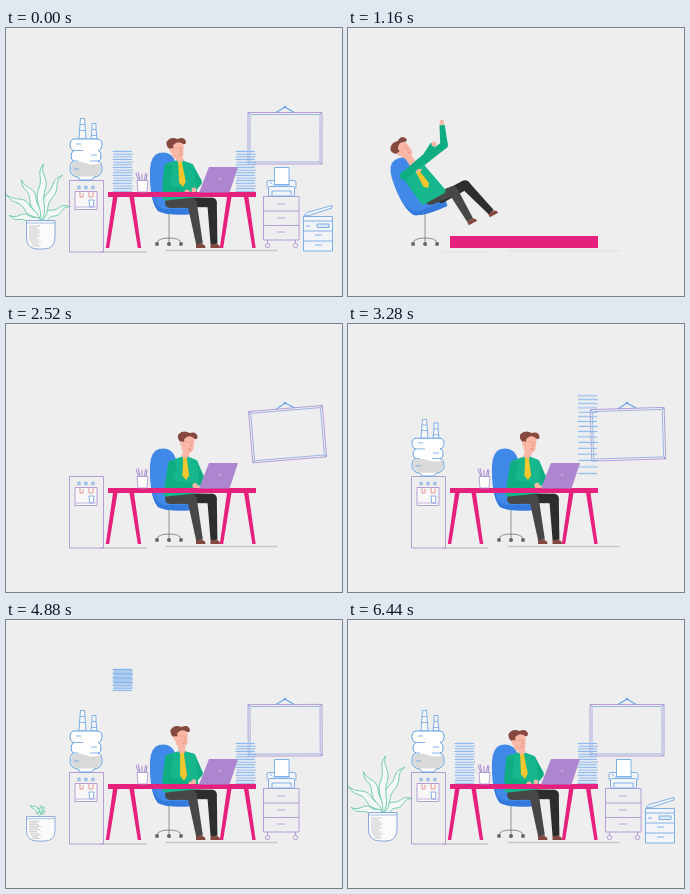
These frames come from a looping animation (336 px wide and 268 px high, 6.48 s). An HTML page with a canvas:

```html
<!DOCTYPE html>
<html>
<head>
<meta charset="utf-8">
<style>
html, body { margin: 0; height: 100%; overflow: hidden; background: #eee }
canvas { display: block; width: 336px; height: 268px }
</style>
</head>
<body>
<canvas></canvas>
<script>
const LOOP = 6480, PAN_END = 960;
const BLUE = '#62a0e6', PURPLE = '#a98bd0', PINK = '#e6207d', GREEN = '#16b78c', SLEEVE = '#10ad83',
  SKIN = '#f9b7a6', HAIR = '#85493f', GRAY = '#858585', NEAR = '#484748', FAR = '#2d2d2d';
const canvas = document.querySelector('canvas'), c = canvas.getContext('2d');
const dpr = window.devicePixelRatio || 1;
canvas.width = 336 * dpr;
canvas.height = 268 * dpr;

const seg = (t, a, b) => Math.max(0, Math.min(1, (t - a) / (b - a)));
const mix = (a, b, p) => a + (b - a) * p;
const smooth = p => p * p * (3 - 2 * p);
const back = p => 1 + 2.7 * (p - 1) ** 3 + 1.7 * (p - 1) ** 2;

function draw(d, fill, stroke, width = 0.8) {
  const p = d instanceof Path2D ? d : new Path2D(d);
  if (fill) { c.fillStyle = fill; c.fill(p); }
  if (stroke) { c.strokeStyle = stroke; c.lineWidth = width; c.stroke(p); }
}
function box(x, y, w, h, fill, stroke, r = 0) {
  const p = new Path2D();
  p.roundRect(x, y, w, h, r);
  draw(p, fill, stroke);
}
function oval(x, y, rx, ry, fill, stroke) {
  const p = new Path2D();
  p.ellipse(x, y, rx, ry, 0, 0, 7);
  draw(p, fill, stroke);
}
// Draws around a pivot with rotation (degrees) and scale; fn uses stage coordinates.
function around(x, y, deg, sx, sy, fn) {
  c.save();
  c.translate(x, y);
  c.rotate(deg * Math.PI / 180);
  c.scale(sx, sy);
  c.translate(-x, -y);
  fn();
  c.restore();
}
function shift(x, y, fn) {
  c.save();
  c.translate(x, y);
  fn();
  c.restore();
}
const grow = (x, y, s, fn) => s > 0.001 && around(x, y, 0, 1, s, fn);

// Pose: head x y turn | shoulders, hips | tie | elbow, hand (twice) | hip, knee, foot (twice) | shoe, chair tilt
const seated = [164, 175, 186, 175, 193.5, 216, 170, 174, 206, 174.5, 208, 216, 0, 0];
const idle = [171.5, 122, 0, 161, 138, 185, 138, 189, 167, 159, 170, 174, 134, 177, 159, 160, 160, 180, 164, 192, 154, 189, 160, ...seated];
const work = [182, 120, 8, 165, 139, 189, 138, 191, 167, 160, 170, 179, 134, 180, 156, 163, 160, 188, 162, 194, 153, 192, 161, ...seated];
const upright = [175.5, 118, 0, 162, 137, 187, 136, 190, 167, 159, 170, 176, 133, 178, 161, 160, 160, 184, 164, 193, 153, 189, 160, ...seated];
const reach = [180, 121, 3, 161, 139, 189, 137, 191, 167, 161, 170, 179, 135, 178, 163, 151, 156, 160, 168, 196, 160, 219, 163, ...seated];
const lean = [142, 122, -36, 141, 146, 157, 135, 181, 163, 161, 174, 156, 144, 166, 160, 164, 129, 171, 116, 182, 117, 180, 97,
  168, 172, 191, 163, 208, 192, 179, 170, 203, 157, 229, 184, -28, -20];
const poses = [[0, idle], [420, work], [PAN_END, work], [PAN_END + 1, lean], [1200, lean], [1460, reach],
  [1780, reach], [2000, work], [4300, work], [4800, upright], [5400, upright], [6200, idle], [LOOP, idle]];

function poseAt(t) {
  let i = 0;
  while (i < poses.length - 2 && t >= poses[i + 1][0]) i++;
  const [a, from] = poses[i], [b, to] = poses[i + 1], p = smooth(seg(t, a, b));
  return from.map((v, k) => mix(v, to[k], p));
}

// Tapered limb: three joints, each with its own radius.
function limb(color, radii, ...p) {
  for (let i = 0; i < 3; i++) {
    const x = p[i * 2], y = p[i * 2 + 1], r = radii[i];
    if (i < 2) oval(x, y, r, r, color);
    if (!i) continue;
    const px = p[i * 2 - 2], py = p[i * 2 - 1], pr = radii[i - 1], n = Math.hypot(x - px, y - py) || 1;
    const nx = (py - y) / n, ny = (x - px) / n;
    draw(`M${px + nx * pr} ${py + ny * pr}L${x + nx * r} ${y + ny * r}L${x - nx * r} ${y - ny * r}L${px - nx * pr} ${py - ny * pr}Z`, color);
  }
}

function man(t) {
  const q = poseAt(t);
  const [hx, hy, turn, lx, ly, rx, ry, bx, by, ax, ay, t1x, t1y, t2x, t2y, e1x, e1y, h1x, h1y, e2x, e2y, h2x, h2y] = q;
  const [hipX, hipY, k1x, k1y, f1x, f1y, hip2X, hip2Y, k2x, k2y, f2x, f2y, shoe, tilt] = q.slice(23);
  const tap = t > 2000 && t < 4300 ? Math.sin(t / 45) : 0;

  draw('M163 184V211M151 215Q152 210 163 210Q174 210 175 215M163 210V214', null, GRAY, 0.9);
  for (const x of [151, 163, 175]) oval(x, 216, 2, 2, '#666');
  around(163, 186, tilt, 1, 1, () => {
    draw('M153 125Q166 122 170 135L172 177H187V186Q161 188 152 183Q143 172 144 141Q145 127 153 125Z', '#4189e8');
    draw('M145 160Q147 178 158 181H186V186Q161 188 152 183Q146 176 145 160Z', '#3479dc');
  });

  const foot = (x, y) => shift(x, y, () => around(0, 0, shoe, 1, 1, () => draw('M-3.5 0H3Q6 1 6 4H-3.5Z', HAIR)));
  foot(f2x, f2y);
  limb(FAR, [5, 4.8, 3.4], hip2X, hip2Y, k2x, k2y, f2x, f2y);
  foot(f1x, f1y);
  limb(NEAR, [5, 4.8, 3.4], hipX, hipY, k1x, k1y, f1x, f1y);

  draw(`M${hx} ${hy}L${t1x} ${t1y}`, null, SKIN, 7);
  limb(SLEEVE, [4.2, 3.8, 2.6], rx - 1, ry + 2, e2x, e2y, h2x, h2y);
  c.lineJoin = 'round';
  draw(`M${lx} ${ly}L${t1x} ${t1y}L${rx} ${ry}L${bx} ${by}L${ax} ${ay}Z`, GREEN, GREEN, 5);
  draw(`M${t1x - 4} ${t1y - 3}L${t1x + 4} ${t1y - 3}L${t1x} ${t1y + 4}Z`, SKIN);
  const dx = t2x - t1x, dy = t2y - t1y, n = Math.hypot(dx, dy), ux = dx / n, uy = dy / n;
  const tiePoint = (s, w) => `${t1x + dx * s - uy * w} ${t1y + dy * s + ux * w}`;
  draw(`M${tiePoint(0, -1.8)}L${tiePoint(0, 1.8)}L${tiePoint(0.8, 3.4)}L${tiePoint(1, 0)}L${tiePoint(0.8, -3.4)}Z`, '#f5c62d');
  limb(SLEEVE, [4, 3.8, 2.6], lx + 1, ly + 2, e1x, e1y, h1x, h1y);
  oval(h1x + 1, h1y + tap, 2.6, 2.6, SKIN);
  const reachX = h2x - e2x, reachY = h2y - e2y, k = 2.5 / (Math.hypot(reachX, reachY) || 1);
  oval(h2x + reachX * k, h2y + reachY * k - tap, 2.3, 2.8, SKIN);

  shift(hx, hy, () => around(0, 0, turn, 1, 1, () => {
    box(-6, -9, 12, 18, SKIN, null, 5);
    draw('M-6 0Q-12 -3 -11 -8Q-7 -14 0 -11Q7 -14 8.5 -8Q8 -4 4 -7Q0 -9 -3 -6Q-5 -5 -4 -2Z', HAIR);
    oval(-6, 0.5, 2, 2.4, SKIN);
    draw('M2 -3L4 2H2M-2 -2H0M4 -2H5.5', null, '#e6917f', 0.7);
    draw('M1 5H4', null, '#d96f6b', 0.7);
  }));
}

function desk(t) {
  const h = 12 * seg(t, 1090, 1160), r = back(seg(t, 1180, 1480));
  if (h <= 0) return;
  const up = t > 1180, y = up ? mix(208, 164, r) : 220 - h;
  if (up) {
    const splay = mix(6, 8.5, smooth(seg(t, 1780, 1960)));
    for (const [x, dir] of [[110, -1], [125, 1], [224, -1], [239.5, 1]]) {
      const f = x + dir * splay;
      draw(`M${x - 2.3} ${y}H${x + 2.3}L${f + 1.7} 220H${f - 1.7}Z`, PINK);
    }
  }
  box(102, y, 148, up ? mix(12, 5, Math.min(1, r)) : h, PINK);
}

function laptop(t) {
  if (t < 1390) return;
  const air = seg(t, 1387, 1773) * 2 - 1, open = back(seg(t, 1780, 2000));
  const shut = [177, 161, 223, 161, 223, 164.5, 177, 164.5], wide = [203, 139, 232, 139, 223.5, 164.5, 193, 164.5];
  const p = shut.map((v, i) => mix(v, wide[i], open));
  shift(0, -121 * (1 - air * air), () => {
    draw('M' + p.join(' ') + 'Z', '#ad86cf');
    if (open > 0.5) oval(214, 151, 1.3, 1.3, '#c3a5de');
  });
}

function cup(t) {
  if (t < 1500) return;
  const air = seg(t, 1500, 1850) * 2 - 1, pens = back(seg(t, 1900, 2100));
  shift(0, -45 * (1 - air * air) + 18 * seg(t, 1500, 1700) * (1 - seg(t, 1800, 1850)), () =>
    around(136.5, 158, 150 * (1 - seg(t, 1560, 1850)), 1, 1, () => {
      grow(136, 154, t > 1900 ? pens : 0, () =>
        draw('M133 153L130 145M134 153L132 144M136 153V146M138 153L140 145M140 153L141 146', null, PURPLE, 1));
      draw('M131 152.5H142L141 164H132Z', '#fff', PURPLE);
    }));
}

function board(t) {
  if (t < 1660) return;
  const s = t - 1700;
  const turn = s < 0 ? -14.5 : -14.5 * Math.cos(s * Math.PI * 2 / 790) * Math.exp(-s / 750);
  const p = seg(t, 1700, 1920), inner = '#8fa6e2';
  around(279, 79, turn, 1, 1, () => {
    for (const x of [243, 315]) for (const y of [85.5, 135]) oval(x, y, 0.8, 0.8, BLUE);
    oval(279, 79, 1.2, 1.2, BLUE);
    if (!p) return;
    c.setLineDash([p * 130, 400]);
    for (const [d, color] of [['M316 84.5H242V136', PURPLE], ['M316 84.5V136H242', PURPLE],
      ['M314 86.5H244V134', inner], ['M314 86.5V134H244', inner]]) draw(d, null, color);
    c.setLineDash([p * 14, 400]);
    draw('M279 79L288 84.5M279 79L270 84.5', null, BLUE, 1);
    c.setLineDash([]);
  });
}

function cooler(t) {
  grow(80, 224, back(seg(t, 2150, 2480)), () => {
    box(63.5, 152.5, 34, 71.5, null, PURPLE);
    box(69, 163.5, 22, 18, '#f7f7f7', PURPLE);
    for (const x of [73, 80, 87]) oval(x, 159.5, 1.4, 1.4, '#cfe0f5', BLUE);
    draw('M74 164V169H77V165M83 164V169H87V164', null, '#e0827f', 0.8);
    draw('M83 172H88L87.3 179H83.7Z', '#fff', BLUE, 0.8);
    draw('M70 179H90', null, PURPLE, 0.6);
  });
  if (t < 2560) return;
  const fall = seg(t, 2560, 2760), squash = 1 - 0.08 * fall * (1 - seg(t, 3280, 3440));
  shift(0, -67 * (1 - fall * fall), () => around(80, 152, 0, 1, squash, () => {
    const tube = (x, y, w, a, b) => grow(x, 111, back(seg(t, a, b)) * (t > a), () => {
      draw(`M${x - w} 111L${x - w + 1} ${y + 6}L${x - 2} ${y}H${x + 2}L${x + w - 1} ${y + 6}L${x + w} 111Z`, '#f6f6f6', BLUE);
      draw(`M${x - w + 1} ${y + 6}H${x + w - 1}M${x - w} ${y + 12}H${x + w}`, null, BLUE, 0.7);
    });
    tube(76.5, 90.5, 3.5, 2900, 3160);
    tube(88, 95.5, 3, 3140, 3440);
    draw('M69 111H91Q96 111 96 116.5T92 122.5Q95 123 95 128T92 133Q96 134 96 141Q96 148 88 149L86 152H74L72 149Q64 148 64 141Q64 134 68 133Q65 132 65 128T68 122.5Q64 122 64 116.5T69 111Z', '#fff', BLUE, 1);
    draw('M66 135Q73 132 80 135T95 135V141Q95 147 88 148.5H72Q65 147 65 141Z', '#d9d9d9');
    draw('M68 122.5H77M84 133H92M68 133H72M70 116H75M85 127H91M68 141H73', null, BLUE, 0.8);
  }));
}

// Sheets hang bunched up, then drop one after another, bottom first.
function stack(x, start, t) {
  if (t < start) return;
  for (let i = 0; i < 16; i++) {
    const p = seg(t, start + i * 8, start + i * 8 + 320);
    const y = mix(69 - i * 1.3, 163.3 - i * 2.65, p * p), j = i * 7 % 3 * 0.5;
    draw(`M${x + j} ${y}H${x + 19.5 + j}`, null, '#7fb2ec', 0.9);
    draw(`M${x + 1} ${y - 1.2}H${x + 18}`, null, '#cfe0f4', 0.7);
  }
}

function cabinet(t) {
  shift(84 * (1 - back(seg(t, 3480, 3960))), 0, () => {
    box(257.5, 168.5, 35.5, 43.5, '#efeeef', PURPLE);
    draw('M257 183H293M257 197.5H293M271 176H279M271 190H279M271 204H279', null, PURPLE);
    for (const x of [261.5, 289.5]) {
      draw(`M${x} 212V215`, null, PURPLE);
      oval(x, 217.5, 2.2, 2.2, '#eee', PURPLE);
    }
  });
  if (t < 4220) return;
  const p = seg(t, 4220, 4480);
  shift(0, -108 * (1 - p * p), () => {
    box(261, 152.5, 29, 8, '#f2f4f7', BLUE, 2);
    box(262.5, 158.5, 26, 9.5, '#f2f4f7', BLUE, 1);
    draw('M267 157H284M266 167V163H285V167M264 155H266', null, BLUE, 0.8);
    if (t > 4480) grow(275, 157, back(seg(t, 4480, 4660)), () => box(268.5, 139.5, 14.5, 17, '#fff', BLUE));
  });
}

function leaf(tx, ty, size) {
  const x0 = 35, y0 = 194, pts = [], n = 16;
  const ex = mix(x0, tx, size), ey = mix(y0, ty, size);
  const mx = mix(x0, ex, 0.35), my = mix(y0, ey, 0.65), len = Math.hypot(ex - x0, ey - y0);
  const nx = -(ey - y0) / len, ny = (ex - x0) / len;
  const point = (s, side) => {
    const wave = Math.sin(s * 13) * 1.2 * size + side * 3.4 * Math.min(1, size + 0.2) * Math.sin(Math.PI * s ** 0.8);
    const q = (a, b, e) => (1 - s) ** 2 * a + 2 * s * (1 - s) * b + s * s * e;
    return `${q(x0, mx, ex) + nx * wave} ${q(y0, my, ey) + ny * wave}`;
  };
  for (let i = 0; i <= n; i++) pts.push(point(i / n, 1));
  for (let i = n; i >= 0; i--) pts.push(point(i / n, -1));
  c.lineJoin = 'round';
  draw('M' + pts.join('L') + 'Z', '#f6f8f7', '#55c3a0', 0.8);
}

function plant(t) {
  const tips = [[0, 167], [64, 178], [15, 152], [56, 147], [3, 188], [37, 136]];
  tips.forEach(([x, y], i) => {
    const size = mix(0.15, 1, back(seg(t, 4860 + i * 30, 5340 + i * 30)));
    if (t > 4800) leaf(x, y, size);
  });
  const s = seg(t, 4560, 4760) * mix(0.86, 1, seg(t, 4880, 5060));
  grow(35, 221.5, s, () => {
    draw('M20.5 192.5H49V209Q49 221 38 221H32Q20.5 221 20.5 209Z', '#fbfbfb', '#7d9fd6', 0.9);
    draw('M20.5 195H49', null, '#7d9fd6', 0.7);
    for (let y = 198; y < 219; y += 2) draw(`M${23 + Math.max(0, y - 211) / 2} ${y}H${31 + y % 5}`, null, '#c9c9c9', 1);
  });
}

function copier(t) {
  grow(312, 223, back(seg(t, 5260, 5620)) * (t > 5260), () => {
    box(297.5, 188.5, 29, 34.5, '#f2f4f7', BLUE);
    draw('M297 193H326M297 203H326M297 213H326M309 207H316M309 217H316M300 198H304', null, BLUE);
    box(311, 196, 12, 3.5, '#dbe8f8', BLUE);
    around(298, 188, -14 * Math.sin(Math.PI * seg(t, 5700, 6300)), 1, 1, () =>
      draw('M298 188L301 184.5L326 177.5V180L303 187.5Z', '#f2f4f7', BLUE));
  });
}

function scene(t) {
  c.globalAlpha = seg(t, 1040, 1500);
  c.lineCap = 'round';
  draw('M95 224H140M160 222.5H271', null, '#c6c6c6', 1.4);
  c.globalAlpha = 1;
  c.lineCap = 'butt';
  board(t);
  plant(t);
  cooler(t);
  cabinet(t);
  copier(t);
  stack(106.5, 4840, t);
  stack(229.5, 2985, t);
}

function frame(now) {
  const t = now % LOOP, leaving = t < PAN_END, s = leaving ? LOOP : t;
  c.setTransform(dpr, 0, 0, dpr, 0, 0);
  c.fillStyle = '#eee';
  c.fillRect(0, 0, 336, 268);
  shift(leaving ? 51.3 * (t / 480) ** 3 : 0, 0, () => {
    scene(s);
    const roll = leaving ? 0 : -230 * (1 - Math.sin(seg(t, 980, 1400) * Math.PI / 2));
    shift(roll, 0, () => man(t));
    desk(s);
    cup(s);
    laptop(s);
  });
  requestAnimationFrame(frame);
}
requestAnimationFrame(frame);
</script>
</body>
</html>
```
